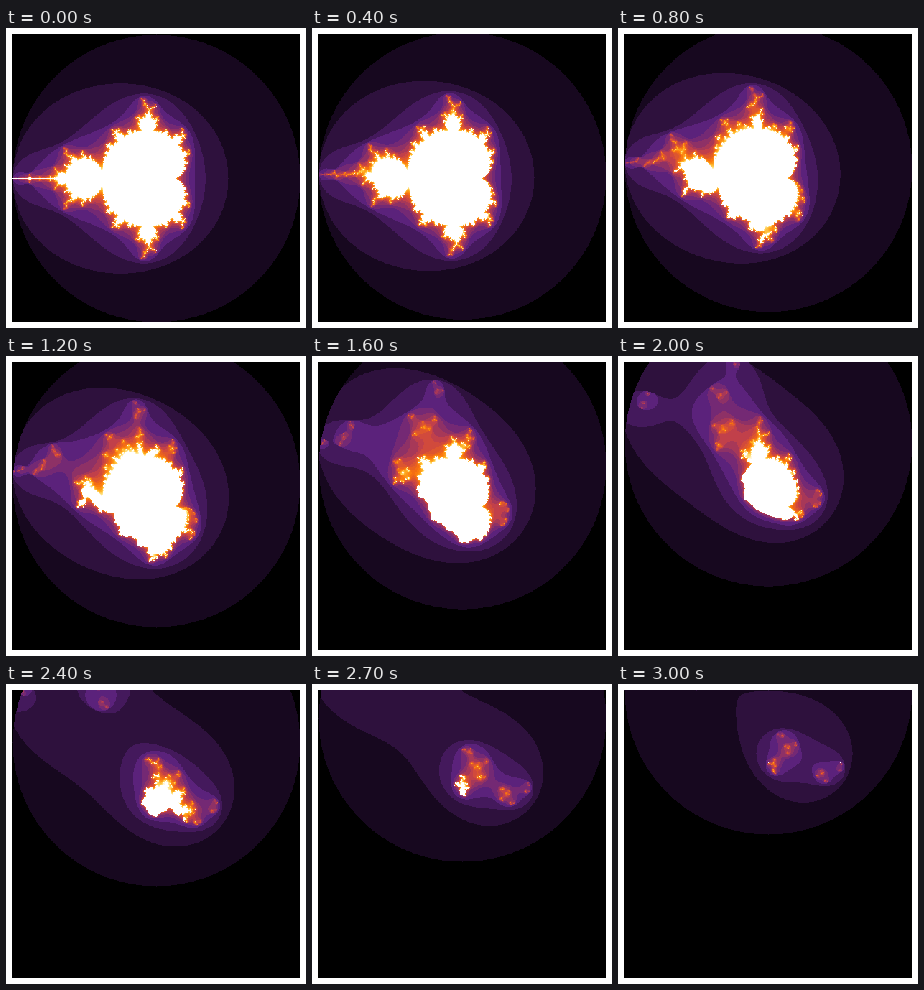
An HTML page with a canvas that plays this animation: 300x300 px, repeating every 3.1 s.

```html
<!DOCTYPE html>
<html lang="en">
<head>
<meta charset="utf-8">
<title>Mandelbrot set with a drifting seed</title>
<style>
  html, body { margin: 0; width: 100%; height: 100%; overflow: hidden; background: #fff; }
  canvas { display: block; width: 300px; height: 300px; }
</style>
</head>
<body>
<canvas id="stage" width="300" height="300"></canvas>
<script>
const SIZE = 288, MARGIN = 6, CELLS = 401;
const STEPS = 30, STEP_MS = 100, LIMIT = 25;
const STOPS = [
  [0, 0, 0], [95, 35, 128], [201, 66, 69], [250, 115, 13],
  [255, 174, 33], [255, 225, 125], [255, 255, 255]
];

// Packed RGBA colour for every iteration count.
const palette = Uint32Array.from({ length: LIMIT + 1 }, (_, n) => {
  const pos = n / LIMIT * (STOPS.length - 1);
  const i = Math.min(Math.floor(pos), STOPS.length - 2);
  const [r, g, b] = STOPS[i].map((v, ch) => Math.round(v + (STOPS[i + 1][ch] - v) * (pos - i)));
  return (255 << 24 | b << 16 | g << 8 | r) >>> 0;
});

const axis = Float64Array.from({ length: SIZE }, (_, i) =>
  (Math.floor(i * CELLS / SIZE) - 200) / 100);

const ctx = document.getElementById('stage').getContext('2d');
const image = ctx.createImageData(SIZE, SIZE);
const pixels = new Uint32Array(image.data.buffer);

function escapeCount(zx, zy, cx, cy) {
  for (let n = 0; n < LIMIT; n++) {
    const x = zx * zx - zy * zy + cx;
    zy = 2 * zx * zy + cy;
    zx = x;
    if (zx * zx + zy * zy > 4) return n;
  }
  return LIMIT;
}

// The iteration starts from (1 + i) * step / STEPS instead of zero.
function draw(step) {
  const seed = step / STEPS;
  for (let row = 0, p = 0; row < SIZE; row++) {
    for (let col = 0; col < SIZE; col++) {
      pixels[p++] = palette[escapeCount(seed, seed, axis[col], axis[row])];
    }
  }
  ctx.putImageData(image, MARGIN, MARGIN);
}

const start = performance.now();
let shown = -1;

function tick() {
  const step = Math.floor((performance.now() - start) / STEP_MS) % (STEPS + 1);
  if (step !== shown) draw(shown = step);
  requestAnimationFrame(tick);
}
tick();
</script>
</body>
</html>
```
